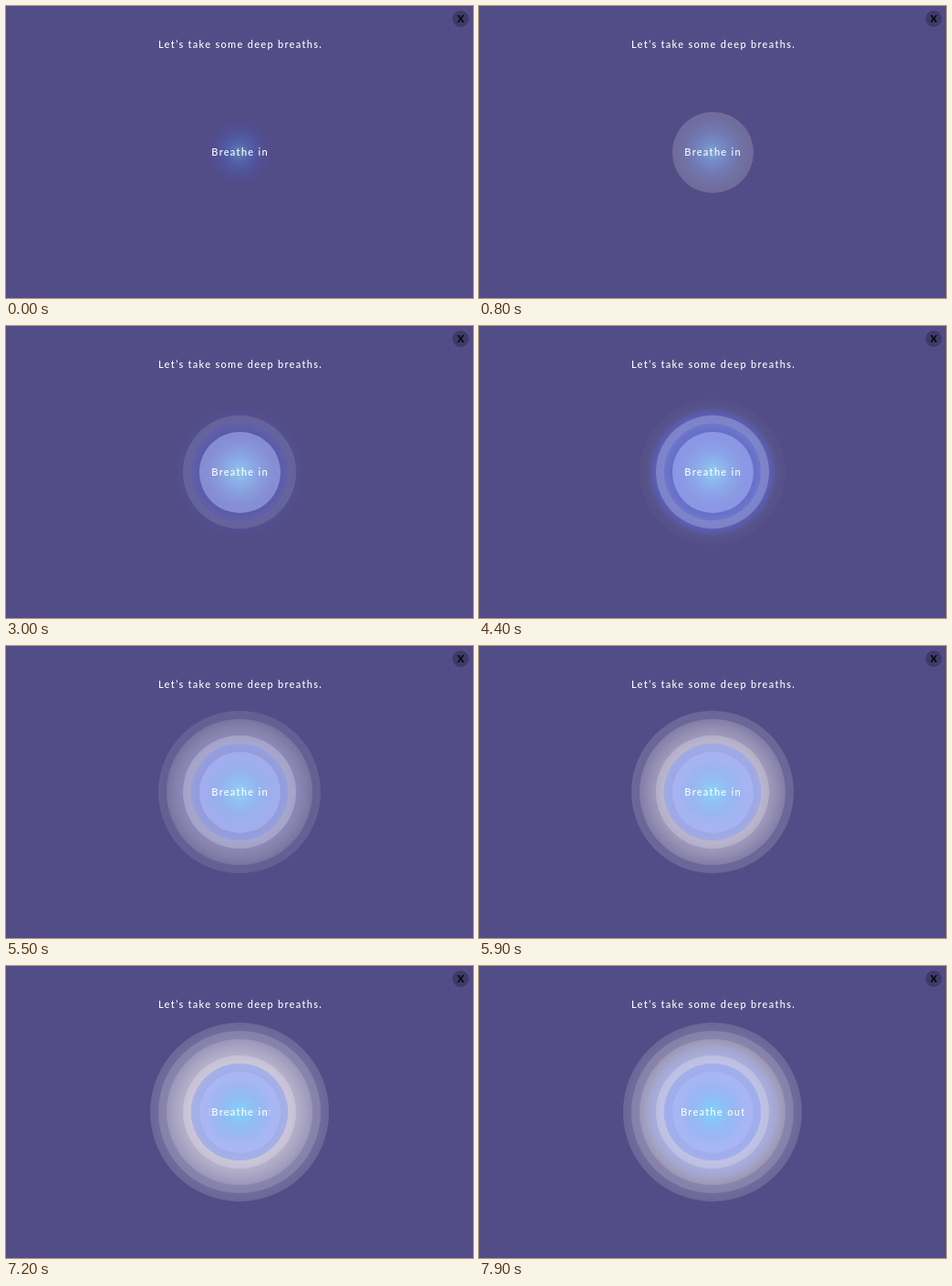
An HTML page for the animation above (8000 ms loop, 512x320 px).

```html
<!DOCTYPE html>
<html lang="en">
<head>
<meta charset="utf-8">
<title>Deep breaths</title>
<style>
html, body { margin: 0; width: 100%; height: 100%; overflow: hidden; background: #534d87; }
.stage { position: relative; width: 512px; height: 320px; overflow: hidden; }
.ring {
  position: absolute; left: 256px; top: 160px;
  width: calc(2 * var(--r)); height: calc(2 * var(--r));
  margin: calc(-1 * var(--r)) 0 0 calc(-1 * var(--r));
  border-radius: 50%;
  background: radial-gradient(closest-side, var(--fill));
}
.ring, .in, .out { animation: 8s linear infinite; }

/* Largest ring first, so the smaller ones lie on top */
.r98 { --r: 98px; --fill: rgba(255,255,255,.25) 60%, rgba(255,255,255,.15); animation-name: r98; }
.r89 { --r: 89px; --fill: rgba(255,255,255,.15), rgba(255,255,255,.15); animation-name: r89; }
.r80 { --r: 80px; --fill: rgba(240,232,240,.46) 68%, rgba(240,232,240,.36) 82%, rgba(255,255,255,.15); animation-name: r80; }
.halo { --r: 71px; --fill: rgba(90,112,230,.58) 70%, rgba(90,110,230,.5) 86%, rgba(85,90,200,.08); animation-name: halo; }
.tide { --r: 72px; --fill: rgba(150,170,245,.4) 75%, rgba(150,170,240,.34); animation-name: tide; }
.r62 { --r: 62px; --fill: rgba(200,220,255,.15) 70%, rgba(255,255,255,.22) 88%, rgba(255,255,255,.22); animation-name: r62; }
.r53 { --r: 53px; --fill: rgba(85,90,200,.3), rgba(85,90,200,.3); animation-name: r53; }
.pale { --r: 53px; --fill: rgba(165,185,248,.6), rgba(165,185,248,.6); animation-name: pale; }
.core { --r: 36px; --fill: rgba(110,205,245,.42), rgba(80,120,210,.42) 35%, rgba(80,90,195,.27) 65%, rgba(80,85,170,0); }
.r44 { --r: 44.5px; --fill: rgba(170,215,255,.4), rgba(255,255,255,.17); animation-name: r44; }
.bloom { --r: 44.5px; --fill: rgba(165,230,255,.5), rgba(160,175,255,.4) 80%, rgba(160,175,255,.4); animation-name: bloom; }
.spark { --r: 38px; --fill: rgba(100,205,250,.55), rgba(125,195,250,.25) 50%, rgba(150,190,250,0); animation-name: spark; }

@keyframes r44 { 0% { opacity: 0 } 10%, 100% { opacity: 1 } }
@keyframes bloom { 0%, 10% { opacity: 0 } 22.5%, 100% { opacity: 1 } }
@keyframes r53 { 0%, 11% { opacity: 0 } 22.5%, 100% { opacity: 1 } }
@keyframes r62 { 0%, 23% { opacity: 0 } 52%, 100% { opacity: 1 } }
@keyframes halo { 0%, 33% { opacity: 0 } 55% { opacity: 1 } 74%, 100% { opacity: 0 } }
@keyframes r80 { 0%, 52.5% { opacity: 0 } 72%, 100% { opacity: 1 } }
@keyframes r89 { 0%, 56% { opacity: 0 } 73.5%, 100% { opacity: 1 } }
@keyframes pale { 0%, 55% { opacity: 0 } 74%, 100% { opacity: 1 } }
@keyframes r98 { 0%, 74% { opacity: 0 } 90%, 100% { opacity: 1 } }
@keyframes spark { 0%, 55% { opacity: 0 } 90%, 100% { opacity: 1 } }
@keyframes tide { 0%, 90% { opacity: 0 } 98.75%, 100% { opacity: 1 } }

svg { position: absolute; inset: 0; }
text { font: 500 11px Lato, "Open Sans", sans-serif; letter-spacing: 1.3px; fill: #fff; }
.close { font-weight: 900; letter-spacing: 0; fill: #0b0a12; text-anchor: middle; }
.in { animation-name: leave; }
.out { animation-name: enter; }
@keyframes leave { 0%, 90% { opacity: 1 } 95%, 100% { opacity: 0 } }
@keyframes enter { 0%, 89% { opacity: 0 } 95%, 100% { opacity: 1 } }
</style>
</head>
<body>
<div class="stage">
  <div class="ring r98"></div>
  <div class="ring r89"></div>
  <div class="ring r80"></div>
  <div class="ring halo"></div>
  <div class="ring tide"></div>
  <div class="ring r62"></div>
  <div class="ring r53"></div>
  <div class="ring pale"></div>
  <div class="ring core"></div>
  <div class="ring r44"></div>
  <div class="ring bloom"></div>
  <div class="ring spark"></div>
  <svg width="512" height="320" viewBox="0 0 512 320">
    <text x="167" y="46">Let’s take some deep breaths.</text>
    <text class="in" x="225.3" y="164">Breathe in</text>
    <text class="out" x="221" y="164">Breathe out</text>
    <circle cx="498.5" cy="14" r="9" fill="#3f3a68"/>
    <text class="close" x="498.5" y="18">X</text>
  </svg>
</div>
</body>
</html>
```
